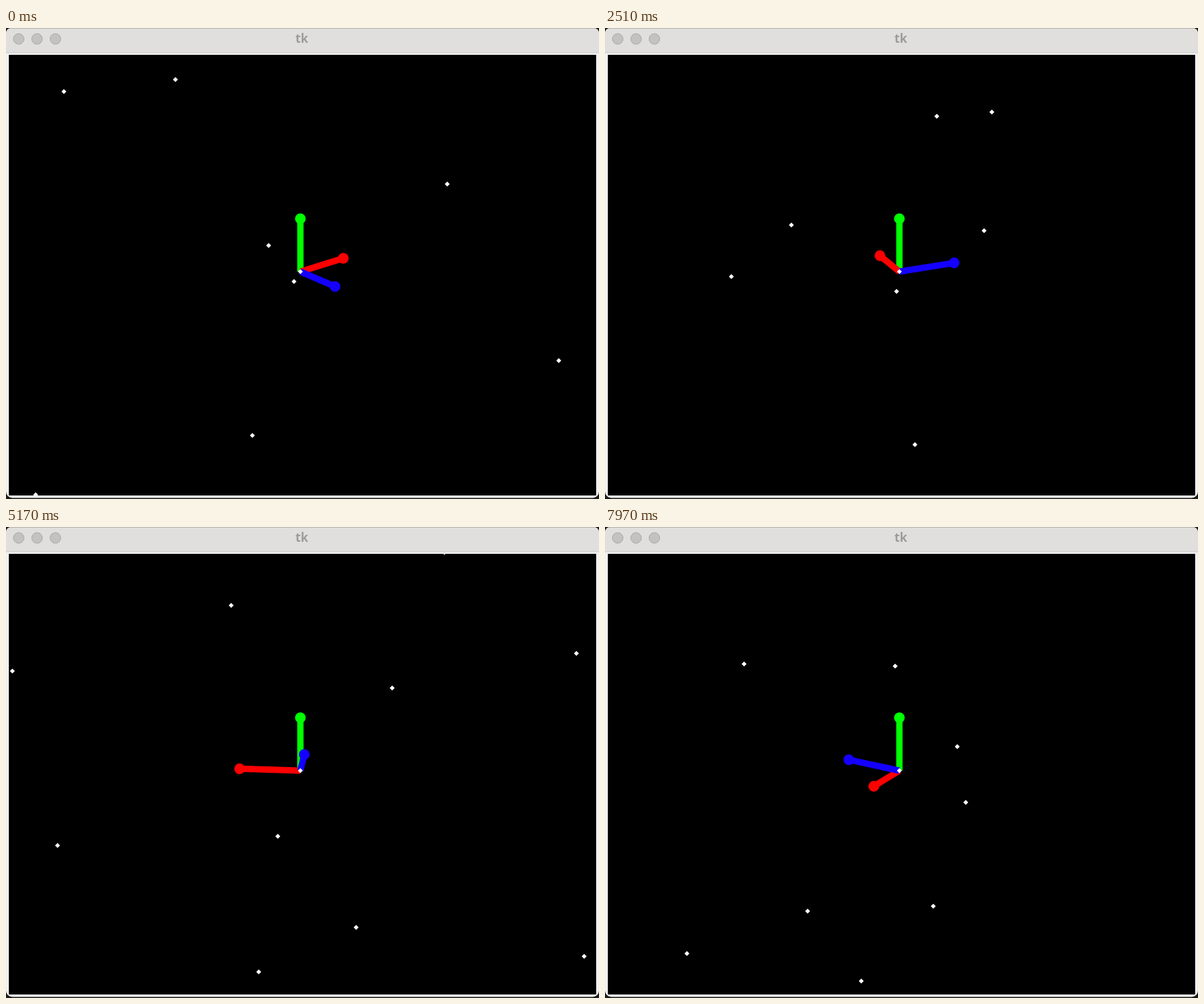
These frames come from a looping animation (840x667 px, 7990 ms). An HTML page:

```html
<!DOCTYPE html>
<html lang="en">
<head>
<meta charset="utf-8">
<title>tk</title>
<style>
  html, body { margin: 0; width: 100%; height: 100%; overflow: hidden; background: #000; }
  svg { display: block; width: 840px; height: 667px; }
  text { font: bold 17px "Open Sans", "Noto Sans", sans-serif; fill: #9b9b9b; text-anchor: middle; }
</style>
</head>
<body>
<svg viewBox="0 0 840 667">
  <defs>
    <clipPath id="view"><rect x="4" y="38" width="832" height="624"/></clipPath>
  </defs>
  <rect width="840" height="667" fill="#1c1c1c"/>
  <rect width="840" height="665.5" rx="9" fill="#f0f0f0"/>
  <path d="M0 35V8Q0 0 8 0H832Q840 0 840 8V35Z" fill="#e0dfdd"/>
  <path d="M5 .5H835" stroke="#b4b4ac"/>
  <path d="M0 35H840" stroke="#c9c9cf"/>
  <g fill="#c2c2c2" stroke="#a9a9a9">
    <circle cx="18" cy="15.5" r="7.5"/>
    <circle cx="44" cy="15.5" r="7.5"/>
    <circle cx="70" cy="15.5" r="7.5"/>
  </g>
  <text x="419" y="21">tk</text>
  <rect x="4" y="38" width="832" height="624" fill="#000"/>
  <g id="scene" clip-path="url(#view)"></g>
</svg>
<script>
const LOOP = 7990, CX = 417, CY = 345, RAD = Math.PI / 180;

// Points in space: distance from the upright axis, drop below the centre, angle
const POINTS = [
  [220, -153, -19], [209, -335, -148], [385, 170, 18], [81, 216, -147], [147, -91, -108],
  [510, -105, 131], [540, -420, -179], [650, -345, -184], [298, 393, -34], [520, 385, -96],
  [476, 473, -104], [490, 433, 140], [495, -285, 79], [570, -205, 79], [500, -210, -91]
];

const scene = document.getElementById("scene");

function set(el, attrs) {
  for (const key in attrs) el.setAttribute(key, attrs[key]);
}

function add(tag, attrs) {
  const el = document.createElementNS("http://www.w3.org/2000/svg", tag);
  set(el, attrs);
  scene.append(el);
  return el;
}

const addStar = () => add("path", { d: "M-3.5 0L0-3.5L3.5 0L0 3.5Z", fill: "#fff" });

function addAxis(color) {
  return {
    line: add("line", { x1: CX, y1: CY, stroke: color, "stroke-width": 9 }),
    ball: add("circle", { r: 7.6, fill: color })
  };
}

function place(el, x, y) {
  el.setAttribute("transform", `translate(${Math.round(CX + x)} ${Math.round(CY + y)})`);
}

function aim(axis, x, y) {
  set(axis.line, { x2: CX + x, y2: CY + y });
  set(axis.ball, { cx: CX + x, cy: CY + y });
}

// Tip of a horizontal axis at the given angle
function aimFlat(axis, deg) {
  const c = Math.cos(deg * RAD), s = Math.sin(deg * RAD);
  aim(axis, 86.5 * c * (1 - 0.2 * s * s), -34 * s * (1 - 0.33 * s * s));
}

// Orbits open wider the higher they lie
function project([radius, drop, start], turn) {
  const p = (start + turn) * RAD;
  const tilt = 0.37 + (Math.min(0, drop) / 750) ** 2;
  return [radius * Math.cos(p), drop - radius * tilt * Math.sin(p)];
}

const stars = POINTS.map(addStar);
const green = addAxis("#00ff00");
const red = addAxis("#ff0000");
const blue = addAxis("#1400ff");
aim(green, 0, -75);
place(addStar(), 0, 0);

// Steps come in threes lasting 20, 20 and 100 ms
function stepAt(ms) {
  const t = ms + 10;
  return 3 * Math.floor(t / 140) + Math.min(2, Math.floor(t % 140 / 20));
}

// Brisk first, then slower, with a slight surge
function turnAt(step) {
  return 1.055 * step + 0.32 * Math.min(step, 68) - 3.5 * Math.sin(step / 50 * 2 * Math.PI);
}

function draw(ms) {
  const turn = turnAt(stepAt(ms));
  POINTS.forEach((point, i) => place(stars[i], ...project(point, turn)));
  aimFlat(red, turn + 40);
  aimFlat(blue, turn - 50);
}

const begin = performance.now();
function tick() {
  draw((performance.now() - begin) % LOOP);
  requestAnimationFrame(tick);
}
tick();
</script>
</body>
</html>
```
